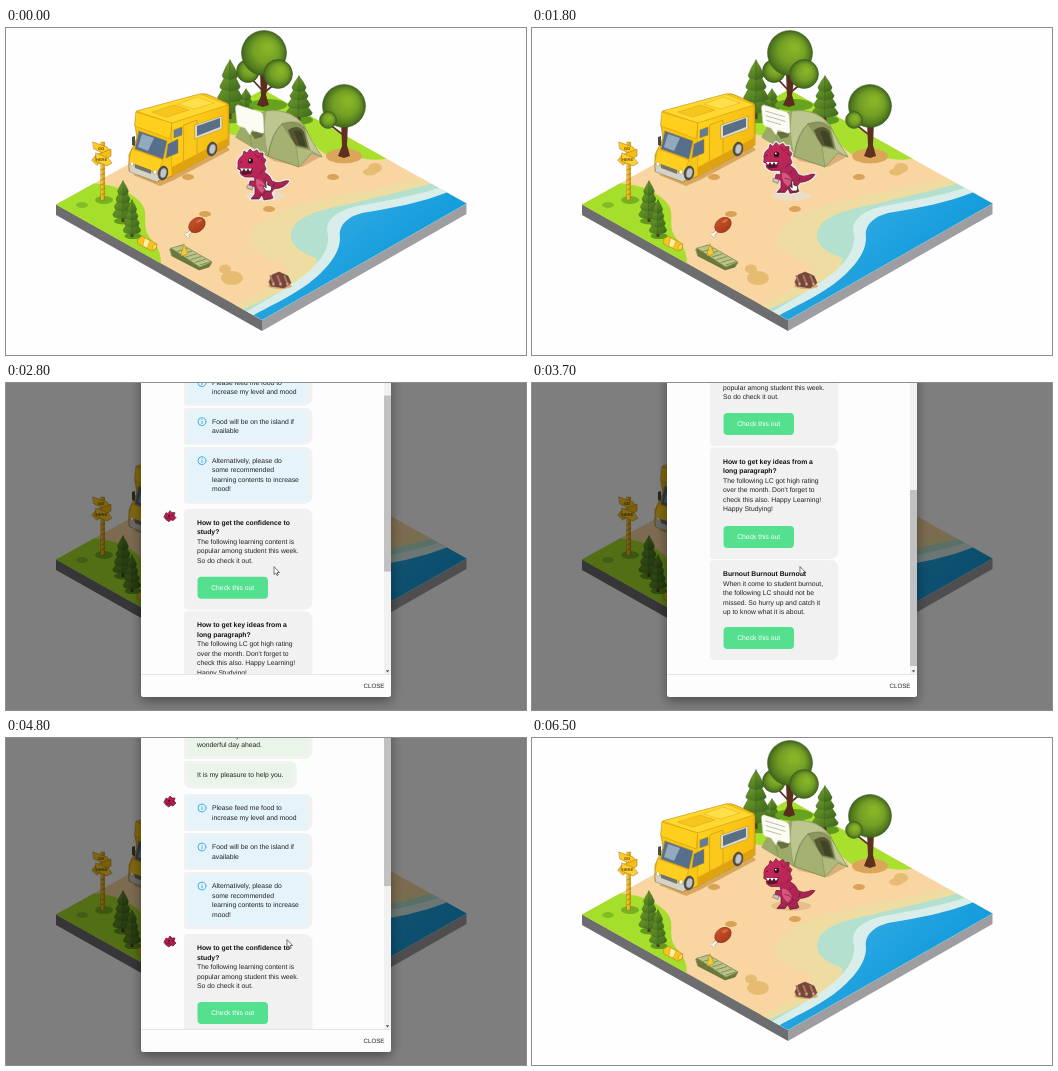
An HTML page with a canvas for the animation above (6600 ms loop, 520x327 px).

```html
<!DOCTYPE html>
<html lang="en">
<head>
<meta charset="utf-8">
<title>Island chat</title>
<style>
  html, body { margin: 0; width: 100%; height: 100%; overflow: hidden; background: #fefdff; }
  canvas { display: block; width: 520px; height: 327px; }
</style>
</head>
<body>
<canvas id="stage"></canvas>
<script>
const W = 520, H = 327, LOOP = 6600, STEP = 100;
const FONT = '"Liberation Sans", Arial, sans-serif';
const dpr = Math.max(1, window.devicePixelRatio || 1);

function prepare(canvas) {
  canvas.width = W * dpr;
  canvas.height = H * dpr;
  const c = canvas.getContext('2d');
  c.scale(dpr, dpr);
  c.lineJoin = c.lineCap = 'round';
  c.textBaseline = 'middle';
  c.textRendering = 'geometricPrecision';
  return c;
}

const stage = document.getElementById('stage');
const screen = prepare(stage);
const sceneCanvas = document.createElement('canvas');
const dialogCanvas = document.createElement('canvas');
const sceneCtx = prepare(sceneCanvas);
const dialogCtx = prepare(dialogCanvas);
let g = sceneCtx;

// Drawing helpers
function shape(d, fill, stroke, width = 0.7) {
  const p = new Path2D(d);
  if (fill) { g.fillStyle = fill; g.fill(p); }
  if (stroke) { g.strokeStyle = stroke; g.lineWidth = width; g.stroke(p); }
}
function oval(x, y, rx, ry, fill, stroke, width = 0.7, turn = 0) {
  g.beginPath();
  g.ellipse(x, y, rx, ry, turn, 0, 7);
  if (fill) { g.fillStyle = fill; g.fill(); }
  if (stroke) { g.strokeStyle = stroke; g.lineWidth = width; g.stroke(); }
}
function box(x, y, w, h, r, fill) {
  g.beginPath();
  g.roundRect(x, y, w, h, r);
  g.fillStyle = fill;
  g.fill();
}
function text(str, x, y, { size = 6.8, color = '#222', bold = false, align = 'left' } = {}) {
  g.font = `${bold ? 'bold ' : ''}${size}px ${FONT}`;
  g.textAlign = align;
  g.fillStyle = color;
  g.fillText(str, x, y + 0.4);
}
function ramp(x0, y0, x1, y1, ...colors) {
  const grad = g.createLinearGradient(x0, y0, x1, y1);
  colors.forEach((c, i) => grad.addColorStop(i / (colors.length - 1), c));
  return grad;
}

// Eased value between [time, value] keys
function track(keys, t) {
  if (t <= keys[0][0]) return keys[0][1];
  for (let i = 1; i < keys.length; i++) {
    const [t0, v0] = keys[i - 1], [t1, v1] = keys[i];
    if (t <= t1) {
      const p = (t - t0) / (t1 - t0);
      return v0 + (v1 - v0) * p * p * (3 - 2 * p);
    }
  }
  return keys[keys.length - 1][1];
}

// Island
function crown(x, y, r) {
  const grad = g.createRadialGradient(x + r * 0.2, y - r * 0.25, r * 0.15, x, y, r);
  grad.addColorStop(0, '#86b426');
  grad.addColorStop(0.5, '#739f25');
  grad.addColorStop(0.8, '#587f20');
  grad.addColorStop(1, '#3d641c');
  oval(x, y, r, r, grad, '#35591b', 0.5);
}
function conifer(x, top, base, w) {
  const h = base - top;
  oval(x + 1, base - 1, w * 0.5, w * 0.18, '#5f9a1e');
  shape(`M${x - 1.5} ${base - 9}h3v9h-3z`, '#5b3622');
  for (let i = 3; i >= 0; i--) {
    const y0 = top + h * 0.17 * i, y1 = top + h * (0.29 + 0.19 * i), half = w * (0.27 + 0.08 * i);
    const tier = side => `M${x} ${y0}Q${x + side * half * 0.55} ${y0 + h * 0.1} ${x + side * half} ${y1 - 2}`
      + `Q${x + side * half} ${y1 + 1} ${x + side * half * 0.6} ${y1 + 1.5}L${x} ${y1 + 2.5}z`;
    shape(tier(-1), ramp(x - half, y0, x, y1, '#7ba62c', '#507c22'), '#41691d', 0.4);
    shape(tier(1), ramp(x, y0, x + half, y1, '#6c9827', '#406a1f'), '#38601c', 0.4);
  }
}

function drawGround() {
  shape('M50 176L256 291V303L50 187z', '#6d6d70');
  shape('M256 291L460.5 175V186L256 303z', '#9d9da2');
  g.save();
  g.clip(new Path2D('M50 176.5L257 61.5L460.5 175.5L256 292z'));
  shape('M0 0H520V327H0z', '#f9d6a1');
  shape('M30 170L84 155C102 156 119 160 131 171C145 182 136 194 141 205C146 215 155 217 155 236L120 250z', '#a6df2b');
  shape('M200 92L257 55L390 128C369 136 356 128 344 130C328 133 318 127 311 119C290 110 254 112 222 106z', '#a8e02d');
  oval(76, 177, 6, 3, '#82bd25');
  shape('M420 148C390 158 352 163 320 171C285 177 253 190 245 206C239 220 258 229 276 235C288 240 276 257 224 279L260 300L470 170z', '#efdca0');
  shape('M430 154C405 162 374 168 344 176C310 182 286 190 285 207C285 223 304 226 311 231C309 248 270 267 231 284L260 300L470 172z', '#b4e0cf');
  shape('M436 159C405 169 378 173 352 178C328 183 318 194 322 207C324 224 309 240 293 251C275 264 256 274 238 285L260 302L474 172z', '#d9eeea');
  shape('M442 164C415 175 385 180 362 184C341 187 332 198 334 210C334 226 320 242 302 256C282 270 262 279 246 288L258 303L474 176z', ramp(345, 185, 390, 240, '#2aa7e2', '#129bdb'));
  g.restore();
  const spots = [[182, 149, 6, 3], [199, 186, 6, 3], [263, 181, 6, 3], [327, 149, 6, 3]];
  for (const [x, y, rx, ry] of spots) oval(x, y, rx, ry, '#d9a254');
  const patches = [[369, 140, 7, 5], [364, 144, 7, 3.5], [219, 241, 6, 4.5], [226, 250, 11, 7]];
  for (const [x, y, rx, ry] of patches) oval(x, y, rx, ry, '#e6bb72');
}

function drawTrees() {
  conifer(240, 61, 92, 18);
  conifer(224, 32, 91, 29);
  conifer(293, 48, 93, 26);
  oval(262, 77, 19, 6, '#67a31f');
  shape('M254 45L255 68L251 77L257 79L263 77L260 67L263 45z', '#5a2d1d');
  shape('M243 48L256 62M271 54L259 64', null, '#5a2d1d', 1.8);
  crown(242, 43, 11.5);
  crown(258, 25, 22.5);
  crown(272, 46, 14.5);
}

function drawVan() {
  shape('M127 147L154 158L168 152L224 122L216 114z', '#d9a75c');
  shape('M131 83L194 66Q199 65 203 67L221 75Q223 76 223 79V117L166 148L150 154L123 143V127L131 110L129 97z', '#f8c617', '#a9780f', 0.6);
  shape('M131 83L194 66L222 77L166 95z', '#ffd930', '#dca416', 0.5);
  shape('M146 84L168 77L183 82L161 89z', '#f7c61d', '#cf9613', 0.4);
  shape('M172 76L191 69L208 75L189 81z', '#ffe04a', '#d6a017', 0.4);
  shape('M130 84L166 95L164 111L129 98z', '#ffcf1c', '#c48f13', 0.5);
  shape('M166 95L222 77V117L166 148z', ramp(165, 100, 222, 120, '#ffd21d', '#f5b90f'), '#c48f13', 0.4);
  shape('M133 103L161 113L157 131L129 121z', '#566f8d', '#b98615', 0.6);
  shape('M136 106L148 110L142 123L132 119z', '#93a9bd');
  shape('M126 121L157 132L152 145L123 135z', '#ffcf1f', '#c08a12', 0.4);
  shape('M123 136L151 146L161 140V145L151 154L124 144z', '#d5d3c8', '#86837a', 0.5);
  shape('M129 136L145 142V146L129 140z', '#75736c');
  oval(126, 136, 1.8, 2.2, '#fffadf', '#91844f', 0.4);
  oval(149, 144, 2, 2.3, '#fffadf', '#91844f', 0.4);
  shape('M162 116L172 111V125L160 130z', '#586f8b', '#b98615', 0.5);
  shape('M178 97L191 92V128L178 135z', '#fbc91c', '#b78311', 0.5);
  shape('M189 97L216 88V101L189 111z', '#dcdcc8', '#a57c18', 0.4);
  shape('M191 98L214 90V99L191 108z', '#596f88');
  shape('M168 102L176 99V107L168 110z', '#637c98', '#a57c18', 0.4);
  shape('M166 139L222 110V117L166 148z', '#e0a310');
  shape('M129 108V118L126 117V109z', '#4b4b44');
  for (const [x, y] of [[157, 145], [206, 121]]) {
    oval(x, y, 4.8, 7, '#4a4c50', '#2e2f31', 0.5, 0.2);
    oval(x + 0.4, y, 3, 4.8, '#c2c5c8', '#83888c', 0.5, 0.2);
  }
}

function drawTent() {
  shape('M231 110L268 133L296 139L316 128L300 108z', '#d9b07a');
  shape('M230 109Q238 90 260 83Q284 80 298 97L306 114L316 129L306 125L293 139L262 128z', '#b0ba7d', '#75834d', 0.6);
  shape('M230 109Q238 90 260 83Q258 104 262 128z', '#9caa6a');
  shape('M260 83Q282 80 296 95Q284 92 276 96Q266 106 262 128Q256 103 260 83z', '#bdc690', '#82905a', 0.4);
  shape('M276 96Q292 90 301 103L305 122L288 118z', '#8b975c', '#68774a', 0.4);
  shape('M282 102Q292 95 298 104L302 120L288 117z', '#57572f');
  shape('M288 103Q295 101 297 108L300 119L293 117z', '#3f4426');
  shape('M276 96L290 118L293 139L262 128Q266 106 276 96z', '#a5b172', '#78864f', 0.5);
  shape('M298 98L306 113L316 129L304 122z', '#c1c996', '#78864f', 0.4);
  shape('M240 95Q244 106 246 118M262 128Q265 104 277 95', null, '#78864f', 0.6);
}

function drawProps() {
  oval(338, 128, 18, 7.5, '#dba659');
  shape('M335 94L336 118L332 128L338 130L344 128L341 117L342 94z', '#5e301e');
  shape('M323 96L336 106', null, '#5e301e', 1.6);
  crown(338, 78, 21.5);
  crown(322, 92, 8.5);

  oval(98, 172, 9, 4, '#77b022');
  shape('M95 114H98.6V172H95z', ramp(95, 0, 99, 0, '#ffd02a', '#c78b10'), '#a5720f', 0.4);
  for (let y = 142; y < 170; y += 5) shape(`M95 ${y}l3.6 -1.5`, null, '#a9780f', 0.7);
  shape('M87 114L101 119L105 124L99 126L88 121z', '#ffcb20', '#9c6e0f', 0.5);
  shape('M86 132L90 127L105 121V128L91 137z', '#f6bd16', '#9c6e0f', 0.5);
  shape('M90 125L102 130L106 135L101 138L90 133z', '#ffd030', '#9c6e0f', 0.5);
  text('GO', 92, 120, { size: 4, color: '#64440d', bold: true });
  text('HERE', 90, 131, { size: 4, color: '#64440d', bold: true });

  conifer(117, 153, 194, 20);
  conifer(126, 172, 209, 17);

  shape('M132 211L136 208L151 216L150 221L146 223L132 216z', '#f8c51f', '#b37912', 0.5);
  shape('M139 210L144 213L141 220L137 218z', '#fff0a5', '#c08a20', 0.4);
  oval(148.5, 219, 2, 3, '#ffdb55', '#b37912', 0.5, 0.4);

  shape('M164 221L176 217L206 234L203 239L193 242L166 228z', '#6b7a3c', '#4c5b2a', 0.5);
  shape('M165 220L177 217L206 234L194 239z', '#bcc389', '#78864f', 0.5);
  for (let i = 0; i < 6; i++) shape(`M${171 + i * 4.6} ${223.5 + i * 2.7}l10 -3`, null, '#7b8a50', 0.9);
  shape('M178 216L182 226L175 228z', '#f3cc28', '#a28420', 0.5);

  const bone = '#fff8ea', rim = '#b3a08c';
  shape('M187 201L181 207', null, rim, 3.2);
  oval(179.8, 206.2, 1.5, 1.4, bone, rim, 0.5);
  oval(182, 208.5, 1.5, 1.4, bone, rim, 0.5);
  shape('M187 201L181 207', null, bone, 2.3);
  oval(191, 197, 9, 6.8, ramp(186, 190, 196, 204, '#c9532a', '#a63a1a'), '#77270f', 0.6, -0.65);
  oval(193, 193, 3.2, 1.4, '#d56b42', null, 0, -0.5);

  oval(274, 258, 12, 3, '#dcb073');
  shape('M263 254L266 247L273 244L282 248L285 255L278 260L265 258z', '#75483b', '#54332c', 0.5);
  for (const x of [266, 273, 280]) {
    shape(`M${x - 1.5} 248L${x + 1.5} 256`, null, '#b0766b', 2);
    oval(x + 1.5, 256, 1.6, 1.9, '#d3a294', '#5c372c', 0.4);
  }
}

function drawScene() {
  shape('M0 0H520V327H0z', '#fefdff');
  drawGround();
  drawTrees();
  drawVan();
  drawTent();
  drawProps();
}

// Creature
const BODY = 'M232 137Q231 131 237 127L238 123L241 125L244 121L247 124L251 122L253 125L257 125L257 129L260 132L258 136L260 141L258 144Q264 147 266 153Q271 156 276 154Q280 152 283 153Q279 160 268 161L265 165L267 170L258 172L256 167L253 171L245 171L249 166L249 159L243 157L244 153L249 153L248 149L239 149Q234 147 234 144L239 143L232 141z';

function drawDino(lift, outlined) {
  oval(259, 168, 20, 5, outlined ? 'rgba(232,222,206,.8)' : 'rgba(180,135,85,.28)');
  g.save();
  g.translate(0, -lift);
  if (outlined) shape(BODY, null, '#f1eaec', 3.2);
  shape(BODY, ramp(240, 125, 262, 170, '#c4285a', '#a52450'), '#6b1a36', 0.7);
  shape('M250 151Q257 151 260 160L256 165Q250 161 250 154z', '#d5567e');
  shape('M233 141L247 140L245 146L237 147z', '#5c142c');
  shape('M234 140.5L236 143.5L238 140.5L240 143.5L242 140.5L244 143.5L246 140.5z', '#fff');
  oval(244.5, 133, 2.6, 2.8, '#30101f');
  oval(243.8, 132, 0.9, 0.9, '#fff');
  oval(235, 134, 0.8, 0.7, '#5c142c');
  shape('M249 126L252 130L255 127M255 131L257 134M257 142L254 146M261 149L258 152M268 156L267 159', null, '#7d1a40', 0.9);
  shape('M242 157L247 158L246 162L241 160z', '#cbc2c8', '#67404f', 0.5);
  shape('M253 157Q259 157 261 163Q259 167 254 167M247 170H252M260 171H265', null, '#751a3b', 0.7);
  g.restore();
}

function drawBubble(phase) {
  shape('M244 104L258 104L256 109L249 111z', '#66713f');
  shape('M232 77L254 84Q257 85 257 88L258 103Q258 106 255 105L246 102L244 107L239 100L233 98Q231 97 231 95L229.5 80Q229.5 77 232 77z', '#fdfcf3', '#dddccd', 0.5);
  const grown = Math.min(1, phase / 0.3) * 3;
  for (let i = 0; i < 3; i++) {
    const w = Math.max(0, Math.min(1, grown - i)) * (i === 2 ? 14 : 19);
    if (w) shape(`M${233.5 + i * 0.6} ${83 + i * 4.7}l${w} ${w * 0.3}`, null, '#b5b4ab', 0.9);
  }
}

// Dialog
const CARDS = [
  { y: 196, h: 101, head: ['How to get the confidence to', 'study?'],
    body: ['The following learning content is', 'popular among student this week.', 'So do check it out.'] },
  { y: 298.5, h: 111.5, head: ['How to get key ideas from a', 'long paragraph?'],
    body: ['The following LC got high rating', "over the month. Don't forget to", 'check this also. Happy Learning!', 'Happy Studying!'] },
  { y: 411, h: 100, head: ['Burnout Burnout Burnout'],
    body: ['When it come to student burnout,', 'the following LC should not be', 'missed. So hurry up and catch it', 'up to know what it is about.'] }
];
const ALERTS = [
  { y: 56, h: 37, lines: ['Please feed me food to', 'increase my level and mood'] },
  { y: 95, h: 37, lines: ['Food will be on the island if', 'available'] },
  { y: 134, h: 57, lines: ['Alternatively, please do', 'some recommended', 'learning contents to increase', 'mood!'] }
];
const LINE = 9.5;

function avatar(x, y) {
  g.save();
  g.translate(x, y);
  shape('M-6 0L-4 -4L-2 -3L0 -6L2 -4L5 -4L4 -1L6 1L3 4L1 3L-1 5L-4 3z', '#b51d4c', '#64142f', 0.7);
  oval(-1, -1, 1, 1, '#38101f');
  shape('M-4 1L1 2M2 -2L4 0', null, '#6b1432', 0.8);
  g.restore();
}

function drawMessages() {
  box(178, -30, 128.5, 51, [8, 8, 8, 2], '#f0f3ef');
  box(182, -27, 120, 45, 4, '#eaf5e9');
  text('Good to see you. Have a', 191, -2.5);
  text('wonderful day ahead.', 191, 7);
  box(178, 23, 113, 27.5, [2, 8, 8, 8], '#f0f3ef');
  box(182, 26, 105, 21.5, 4, '#eaf5e9');
  text('It is my pleasure to help you.', 191, 37);

  avatar(164, 64);
  for (const { y, h, lines } of ALERTS) {
    box(178, y, 128.5, h, [3, 8, 8, 3], '#f0f1f2');
    box(182, y + 3, 119, h - 6, 3, '#e5f3fb');
    oval(196, y + 14, 4, 4, null, '#35a8df', 0.9);
    shape(`M196 ${y + 13.7}v2.2M196 ${y + 12}v.1`, null, '#35a8df', 0.9);
    lines.forEach((s, i) => text(s, 206, y + 14 + i * LINE));
  }

  avatar(164, 204);
  for (const { y, h, head, body } of CARDS) {
    box(178, y, 128.5, h, [4, 8, 8, 4], '#f1f1f1');
    head.forEach((s, i) => text(s, 191, y + 14 + i * LINE, { bold: true, color: '#111' }));
    body.forEach((s, i) => text(s, 191, y + 14 + (head.length + i) * LINE));
    const by = y + h - 33;
    box(191.5, by, 70.5, 22, 4, '#54e08f');
    text('Check this out', 226.7, by + 11, { color: '#fff', align: 'center' });
  }
}

function drawDialog(scroll, t) {
  g.clearRect(0, 0, W, H);
  g.fillStyle = 'rgba(0,0,0,.5)';
  g.fillRect(0, 0, W, H);
  g.save();
  g.shadowColor = 'rgba(0,0,0,.4)';
  g.shadowBlur = 12 * dpr;
  g.shadowOffsetY = 4 * dpr;
  box(135, -40, 250, 354, 2.5, '#fdfdfe');
  g.restore();

  g.save();
  g.beginPath();
  g.rect(135, 0, 250, 291.5);
  g.clip();
  g.translate(0, -scroll);
  drawMessages();
  g.restore();

  box(378, 0, 7, 291.5, 0, '#f1f1f1');
  box(378, -28 + scroll * 0.577, 7, 176, 0, '#c1c1c1');
  shape('M379.8 287.3H383.2L381.5 289.4z', '#505050');
  box(135, 291.3, 250, 0.8, 0, '#dedede');
  if (t >= 5400) box(354, 295, 28, 16, 2, '#f0f0f0');
  if (t >= 5800) oval(372, 302, 7, 7, 'rgba(0,0,0,.2)');
  text('CLOSE', 368, 302.5, { size: 6.2, align: 'center' });
}

// Pointer
const POINTER_X = [[1900, 260], [2200, 268], [4300, 268], [4800, 281], [5000, 281], [5500, 374]];
const POINTER_Y = [[1900, 153], [2200, 184], [4300, 184], [4800, 202], [5000, 202], [5500, 300]];

function drawPointer(t) {
  if (t >= 6200) return;
  g.save();
  g.translate(track(POINTER_X, t), track(POINTER_Y, t));
  if (t < 1900 || t >= 5400) {
    shape('M0 0Q1.5 -.5 1.7 1V4L5 5Q6 5.5 5.5 8L4.5 10H0L-2.5 6.5Q-2 5 0 6.5z', '#fff', '#222', 0.7);
  } else {
    shape('M0 0V7.5L1.8 6L3 8.5L4.2 8L3 5.5H5.2z', '#fff', '#222', 0.6);
  }
  g.restore();
}

const SCROLL = [[2300, 0], [2900, 76], [3000, 85], [3100, 85], [3700, 234], [3800, 234], [4200, 149], [4300, 149], [4800, 0]];
const FADE = [[1800, 0], [2020, 1], [5800, 1], [6010, 0]];

drawScene();

function render(t) {
  const fade = track(FADE, t);
  const phase = t / LOOP * 5 % 1;
  g = screen;
  g.drawImage(sceneCanvas, 0, 0, W, H);
  drawDino(4 - 4 * Math.cos(phase * 2 * Math.PI), t < 1900);
  drawBubble(t < 1300 ? phase : 1);
  if (fade > 0) {
    g = dialogCtx;
    drawDialog(track(SCROLL, t), t);
    g = screen;
    g.globalAlpha = fade;
    g.drawImage(dialogCanvas, 0, 0, W, H);
    g.globalAlpha = 1;
  }
  drawPointer(t);
}

function tick() {
  const t = performance.now() % LOOP;
  render(Math.floor(t / STEP) * STEP);
  requestAnimationFrame(tick);
}
tick();
</script>
</body>
</html>
```
